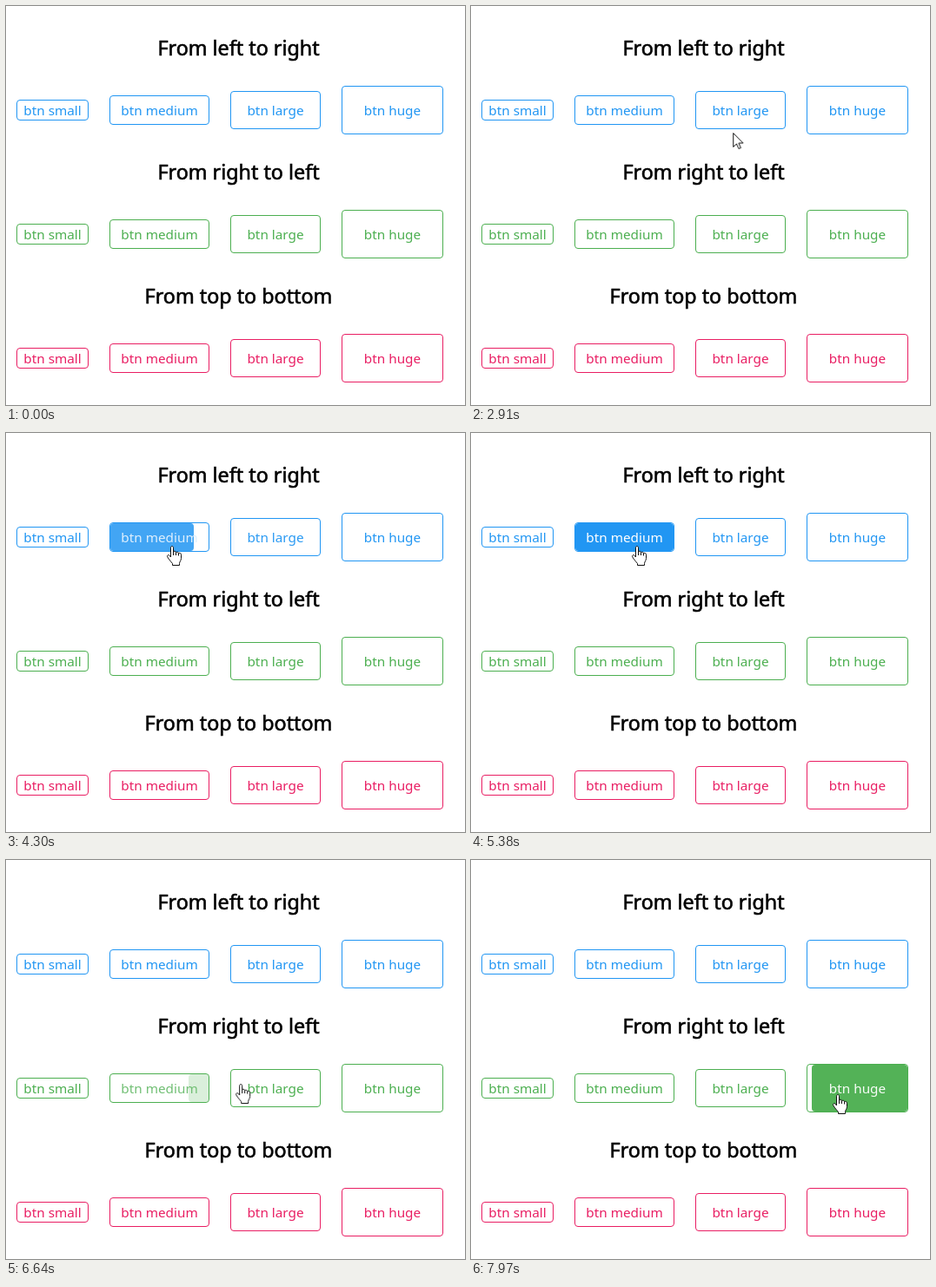
Animation of 528x460 px, one loop 8 s. Source, as an HTML page:

```html
<!DOCTYPE html>
<html lang="en">
<head>
<meta charset="utf-8">
<title>Button fills</title>
<style>
  @property --p { syntax: "<number>"; inherits: true; initial-value: 0; }
  @property --hand { syntax: "<number>"; inherits: true; initial-value: 0; }

  html, body { margin: 0; width: 100%; height: 100%; overflow: hidden; background: #fff; }
  body { position: relative; font-family: "Noto Sans", "Open Sans", sans-serif; }

  section { position: absolute; left: 0; width: 528px; height: 143px; }
  .blue { top: 0; --c: #2196f3; }
  .green { top: 143px; --c: #4caf50; }
  .pink { top: 286px; --c: #e91e63; }

  h2 {
    position: absolute; left: 0; top: 32px; width: 535px; margin: 0;
    font-size: 23.3px; font-weight: 400; line-height: 32px; text-align: center;
    color: #000; -webkit-text-stroke: .6px #000;
  }

  .btn {
    position: absolute; box-sizing: border-box; border: 1px solid var(--c); border-radius: 4px;
    font-size: 15.3px; text-align: center; white-space: nowrap;
    color: color-mix(in srgb, #fff calc(var(--p) * 100%), var(--c));
  }
  .btn::before {
    content: ""; position: absolute; top: 0; bottom: 0; left: 0;
    width: calc(var(--p) * 100%); opacity: var(--p);
    background: var(--c); border-radius: 4px;
  }
  .green .btn::before { left: auto; right: 0; }
  .btn span { position: relative; }

  .small { left: 12px; top: 108px; width: 83px; height: 24px; line-height: 22px; }
  .medium { left: 119px; top: 103px; width: 115px; height: 34px; line-height: 32px; }
  .large { left: 258px; top: 98px; width: 104px; height: 44px; line-height: 42px; }
  .huge { left: 386px; top: 92px; width: 117px; height: 56px; line-height: 54px; }

  /* 1% = 80ms, each fill takes 400ms */
  .blue .huge { animation: blue-huge 8s ease infinite; }
  .blue .large { animation: blue-large 8s ease infinite; }
  .blue .medium { animation: blue-medium 8s ease infinite; }
  .green .medium { animation: green-medium 8s ease infinite; }
  .green .large { animation: green-large 8s ease infinite; }
  .green .huge { animation: green-huge 8s ease infinite; }

  @keyframes blue-huge { 0%, 16.65% { --p: 0; } 21.65%, 31% { --p: 1; } 36%, 100% { --p: 0; } }
  @keyframes blue-large { 0%, 36.9% { --p: 0; } 41.9%, 50% { --p: 1; } 55%, 100% { --p: 0; } }
  @keyframes blue-medium { 0%, 51% { --p: 0; } 56%, 68.5% { --p: 1; } 73.5%, 100% { --p: 0; } }
  @keyframes green-medium { 0%, 71.5% { --p: 0; } 76.5%, 80.55% { --p: 1; } 85.55%, 100% { --p: 0; } }
  @keyframes green-large { 0%, 83% { --p: 0; } 88%, 94.6% { --p: 1; } 99.6%, 100% { --p: 0; } }
  @keyframes green-huge { 0%, 95.95% { --p: 0; } 100% { --p: .967; animation-timing-function: linear; } }
  .green .huge { animation-name: green-huge-cut; }
  @keyframes green-huge-cut { 0%, 95.95% { --p: 0; } 99.65% { --p: .957; } 100% { --p: .965; } }

  .cursor {
    position: absolute; left: 0; top: 0; overflow: visible;
    fill: #fff; stroke: #111; stroke-width: 1; stroke-linejoin: round;
    animation: travel 8s linear infinite, shape 8s step-end infinite;
  }
  .hand { opacity: var(--hand); }
  .arrow { opacity: calc(1 - var(--hand)); }

  @keyframes travel {
    0%, 13.25% { transform: translate(520px, 160px); }
    16.65% { transform: translate(476px, 145px); }
    19.75%, 29.1% { transform: translate(463px, 135px); }
    31% { transform: translate(398px, 149px); }
    36.4% { transform: translate(301px, 146px); }
    37% { transform: translate(292px, 139px); }
    38% { transform: translate(285px, 132px); }
    39.25%, 48.7% { transform: translate(282px, 128px); }
    50% { transform: translate(258px, 131px); }
    51% { transform: translate(234px, 134px); }
    53.5%, 67.3% { transform: translate(191px, 130px); }
    68.5% { transform: translate(192px, 138px); }
    71.5% { transform: translate(196px, 246px); }
    75%, 78.1% { transform: translate(200px, 256px); }
    80.55% { transform: translate(234px, 257px); }
    83% { transform: translate(270px, 258px); }
    86%, 93.6% { transform: translate(305px, 259px); }
    94.6% { transform: translate(362px, 263px); }
    95.95% { transform: translate(388px, 266px); }
    98.5%, 100% { transform: translate(422px, 270px); }
  }
  @keyframes shape {
    0% { opacity: 0; --hand: 0; }
    13.25% { opacity: 1; --hand: 0; }
    16.65% { opacity: 1; --hand: 1; }
    31% { opacity: 1; --hand: 0; }
    36.9% { opacity: 1; --hand: 1; }
    50% { opacity: 1; --hand: 0; }
    51% { opacity: 1; --hand: 1; }
    68.5% { opacity: 1; --hand: 0; }
    71.5% { opacity: 1; --hand: 1; }
    80.55% { opacity: 1; --hand: 0; }
    82.2% { opacity: 1; --hand: 1; }
    94.6% { opacity: 1; --hand: 0; }
    95.95%, 100% { opacity: 1; --hand: 1; }
  }
</style>
</head>
<body>
  <section class="blue">
    <h2>From left to right</h2>
    <div class="btn small"><span>btn small</span></div>
    <div class="btn medium"><span>btn medium</span></div>
    <div class="btn large"><span>btn large</span></div>
    <div class="btn huge"><span>btn huge</span></div>
  </section>
  <section class="green">
    <h2>From right to left</h2>
    <div class="btn small"><span>btn small</span></div>
    <div class="btn medium"><span>btn medium</span></div>
    <div class="btn large"><span>btn large</span></div>
    <div class="btn huge"><span>btn huge</span></div>
  </section>
  <section class="pink">
    <h2>From top to bottom</h2>
    <div class="btn small"><span>btn small</span></div>
    <div class="btn medium"><span>btn medium</span></div>
    <div class="btn large"><span>btn large</span></div>
    <div class="btn huge"><span>btn huge</span></div>
  </section>
  <svg class="cursor" width="20" height="24">
    <path class="arrow" d="M.5 .5V16.5L4.3 12.9 6.8 18.5 9.2 17.5 6.8 12H11.8Z"/>
    <g class="hand" transform="translate(-6 0)">
      <path d="M4.5 13V2.2C4.5 0 7.5 0 7.5 2.2V7C8 5.8 10.4 6 10.6 7.8C11.2 6.8 13.4 7 13.6 8.8C14.2 8 16.5 8.2 16.5 10.3V14.5C16.5 17 14.5 18.5 14.5 20.5V22.5H6.5V20.5C5 18.5 2.5 16 .8 13C-.2 11.2 1.8 9.8 3 11.2Z"/>
      <path fill="none" d="M7.5 7V11M10.5 7.8V11M13.5 8.8V11.5"/>
    </g>
  </svg>
</body>
</html>
```
